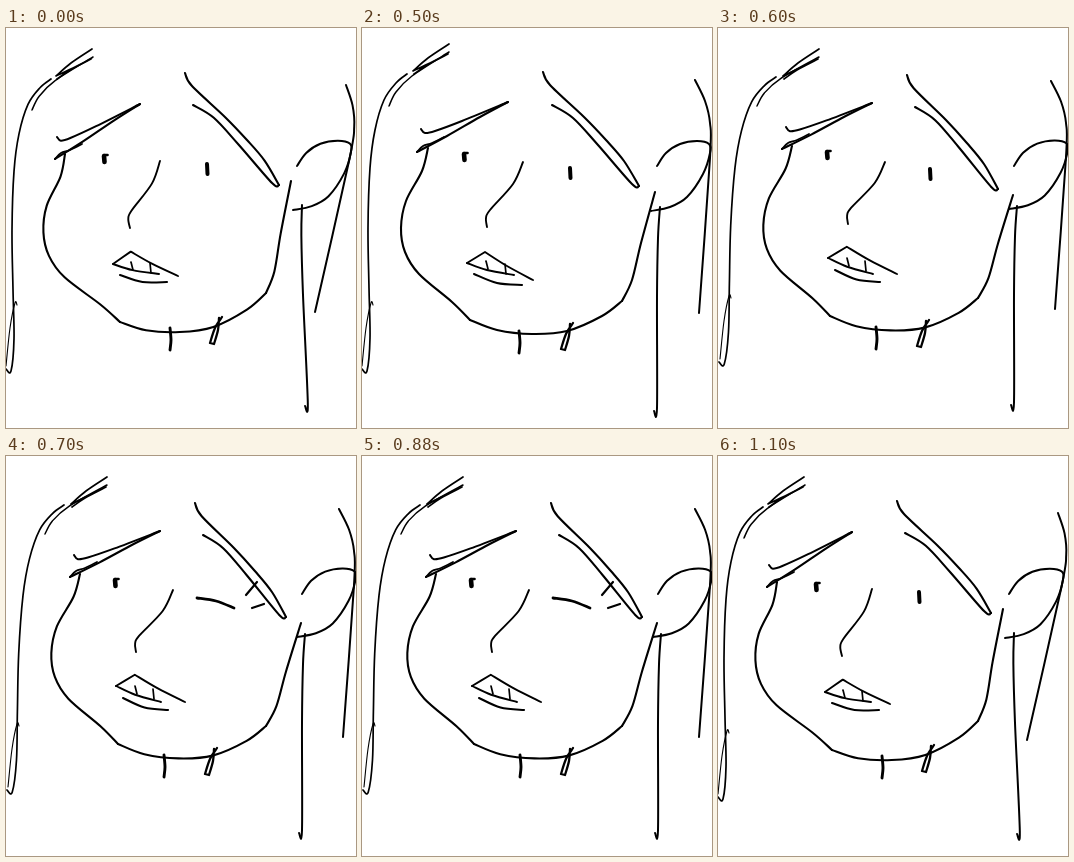
Write an HTML page that moves like this. It is 350 by 400 pixels and loops after 1200 ms.

```html
<!DOCTYPE html>
<html lang="en">
<head>
<meta charset="utf-8">
<title>Wink</title>
<style>
html, body { margin: 0; width: 100%; height: 100%; overflow: hidden; background: #fff; }
svg { display: block; width: 100%; height: 100%; }
path { fill: none; stroke: #000; stroke-linecap: round; stroke-linejoin: round; }
</style>
</head>
<body>
<svg viewBox="0 0 350 400"></svg>
<script>
// One drawing of the half-turned head. A stroke is a smooth curve through key points; "|" is a corner.
// "front" and "away" say how far its start, and its end if different, move in those poses.
const stroke = (pen, line, front, away) => ({ pen, line, front, away });

const hair = [
  stroke(1.7, '45,46 34,55 22,72 13,102 8,140 6,200 7,260 8,310 5,343 0,341', [0, 5, 0, 0], [13, 3, 1, -7]),
  stroke(1.1, '11,277 9,275 4,300 0,338', [0, 0], [2, -7]),
  stroke(1.5, '27,78 34,64 50,48 87,24', [-1, 4, 0, 5], [12, 0, 14, 5]),
  stroke(1.7, '87,16 66,30 51,43 | 70,34 86,26 | 65,37 52,46', [-1, 5], [14, 5])
];
const features = [
  stroke(2, '59,101 63,105 73,103 100,93 146,74', [-8, 8, -12, 2], [9, -2, 8, 1]),
  stroke(2.1, '146,74 118,89 85,108 55,124', [-12, 2, -6, 7], [8, 1, 9, -3]),
  stroke(1.8, '55,124 61,118 70,115 82,109', [-6, 7], [9, -3]),
  stroke(2.1, '181,44 188,57 222,89 244,112 262,133 277,158', [-2, 1, -4, -1], [8, 3, 3, 3]),
  stroke(2.1, '277,158 270,156 236,117 211,90 190,77', [-4, -1, -3, 0], [3, 3, 7, 2]),
  stroke(4.6, '102,126 102.5,132', [-4, 2], [7, -2]),
  stroke(2.6, '102,125 105.5,125', [-4, 2], [7, -2]),
  stroke(1.9, '161,134 151,156 128,182 124,190 125,199', [-7, -1, -1, 1], [6, 0, 5, -3]),
  stroke(1.9, '105,235 123,224 | 145,238 171,252', [2, 1, 1, -4], [5, -5, 8, -6]),
  stroke(1.9, '105,235 125,242 152,247', [2, 1, 1, -1], [5, -5, 3, -1]),
  stroke(1.7, '124,233 126,241', [1, 1], [5, -3]),
  stroke(1.7, '143,236 144,246', [1, -1], [4, -3]),
  stroke(2.1, '112,246 135,255 160,257', [2, 1, 1, -3], [5, -4, 2, -3])
];
const outline = [
  stroke(2.1, '66,120 60,143 44,173 39,200 43,224 57,246 90,274 108,292', [-7, 6, 6, 2], [8, -2, 4, -4]),
  stroke(2.1, '108,292 135,302 170,306 205,303 240,288 260,273', [6, 2, 0, -8], [4, -4, 0, -3]),
  stroke(2.1, '260,273 270,252 279,215 293,164', [0, -8, -8, -11], [0, -3, 2, 3]),
  stroke(2.9, '157,303 158,315 157,325', [7, -3], [1, -4]),
  stroke(2.3, '211,295 204,306 199,321 | 203,322 | 207,308 208,296', [5, -6], [0, -3])
];
const side = [
  stroke(2, '295,138 304,125 318,116 335,113 347,116 348,125 341,146 325,169 308,179 289,183', [-4, 0, -2, -1], [1, 0, 2, -2]),
  stroke(2, '333,52 343,73 348,95 348,130 337,285', [7, 5, -28, -1], [0, 1, 0, -4]),
  stroke(2, '298,179 296,210 295,270 295,380 292,383', [-2, -2, 7, -5], [1, -1, 1, -6])
];
const openEye = [stroke(4, '208,140 208.5,150', [-7, -4], [4, 1])];
const wink = ['187,141 206,144 224,151', '247,125 236,138', '242,151 254,147']
  .map((line, i) => stroke(i ? 2.2 : 2.8, line, [0, 0], [4, 1]));

// Shifts every point by its share of the way along the stroke
function move(points, [dx, dy, ex = dx, ey = dy]) {
  let length = 0;
  const along = points.map(([x, y], i) => {
    const [px, py] = points[i - 1] || [x, y];
    return length += Math.hypot(x - px, y - py);
  });
  return points.map(([x, y], i) => {
    const k = along[i] / length;
    return [x + dx + (ex - dx) * k, y + dy + (ey - dy) * k];
  });
}

// Catmull-Rom spline as cubic Béziers
function curve(p) {
  const at = i => p[Math.max(0, Math.min(p.length - 1, i))];
  const handle = (j, sign) => [0, 1].map(k => at(j)[k] + sign * (at(j + 1)[k] - at(j - 1)[k]) / 6);
  return p.slice(1).map((to, i) => `C${handle(i, 1)} ${handle(i + 1, -1)} ${to}`).join('');
}

function path(s, pose) {
  const runs = s.line.split(' | ').map(run => run.split(' ').map(xy => xy.split(',').map(Number)));
  const points = move(runs.flat(), s[pose] || [0, 0]);
  let from = 0, d = 'M' + points[0];
  for (const run of runs) {
    const end = from + run.length;
    d += curve(points.slice(Math.max(0, from - 1), end));
    from = end;
  }
  return `<path d="${d}" stroke-width="${s.pen}"/>`;
}

const svg = document.querySelector('svg');
const draw = (pose, eye) =>
  [hair, features, outline, side, eye].flat().map(s => path(s, pose)).join('');
const front = draw('front', openEye), half = draw('half', openEye);
const away = draw('away', openEye), winking = draw('away', wink);

// [end time in ms, picture]
const steps = [[500, front], [600, half], [700, away], [1000, winking], [1100, half], [1200, front]];
const start = performance.now();
let shown;
function tick() {
  const t = (performance.now() - start) % 1200;
  const next = steps.find(([end]) => t < end)[1];
  if (next !== shown) svg.innerHTML = shown = next;
  requestAnimationFrame(tick);
}
tick();
</script>
</body>
</html>
```
